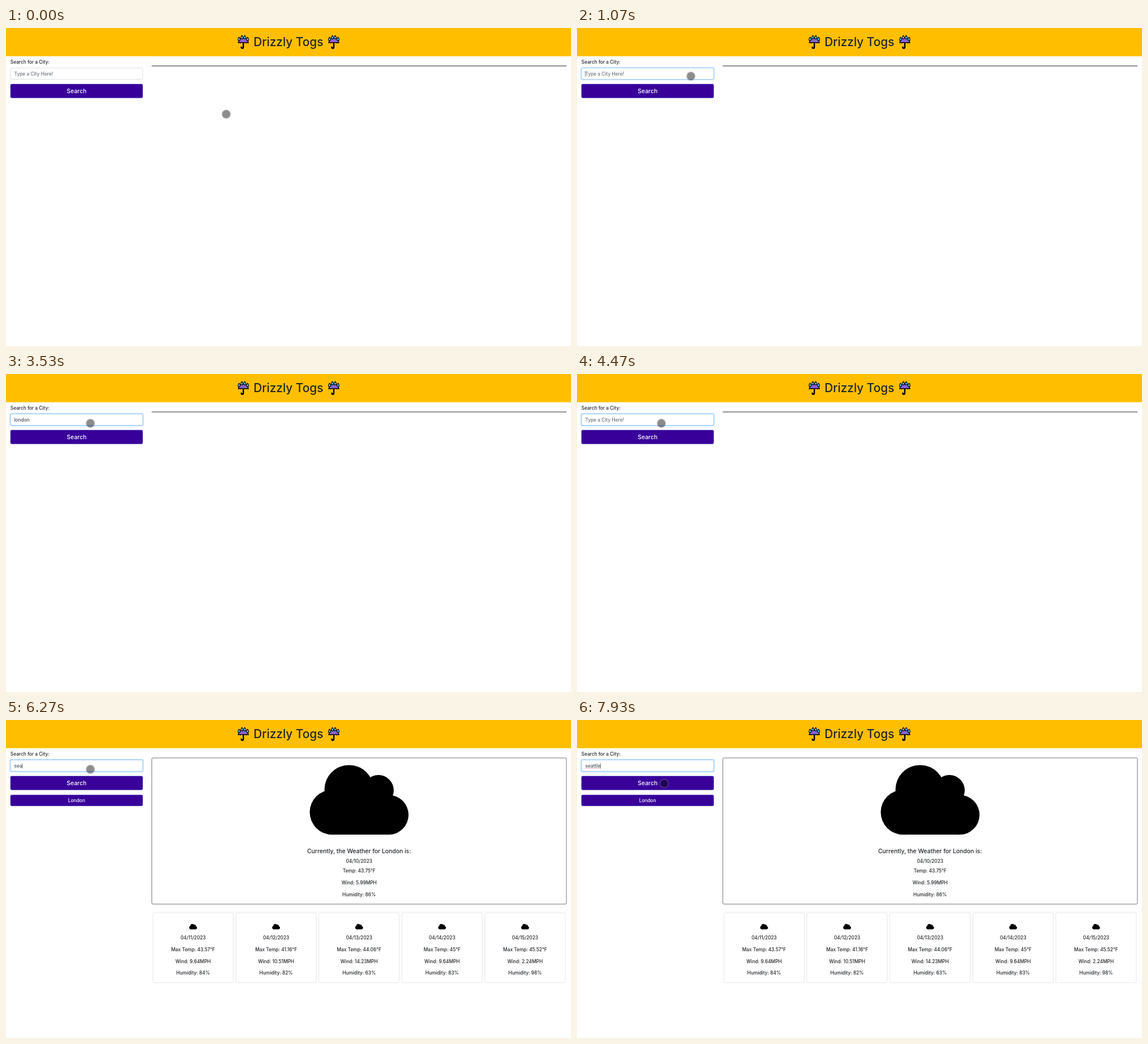
An HTML page for the animation above (8000 ms loop, 998 px wide and 561 px high).

```html
<!DOCTYPE html>
<html lang="en">
<head>
<meta charset="utf-8">
<title>Drizzly Togs</title>
<style>
  html, body { margin: 0; width: 100%; height: 100%; overflow: hidden; background: #fff; }
  svg { display: block; width: 100%; height: 100%; }
  text { font: 500 8.32px Inter, Roboto, sans-serif; fill: #212529; }
  .mid { text-anchor: middle; }
  .title { font-size: 20.8px; }
  .big { font-size: 10.4px; }
  .btn { fill: #380099; stroke: #2a1cb0; stroke-width: .5; }
  .light { fill: #fff; }
</style>
</head>
<body>
<svg viewBox="0 0 998 561" xmlns="http://www.w3.org/2000/svg">
  <defs>
    <g id="umbrella" stroke="#000" stroke-linejoin="round" stroke-linecap="round">
      <path d="M10.5 12V21.5Q10.5 23.8 8.7 23.8Q7 23.8 7 21.8" fill="none" stroke-width="2.4"/>
      <path d="M1.6 14.3C2 8.4 5.8 5.2 10.5 5.2S19 8.4 19.4 14.3Q17.8 12.8 16 14.3Q13.4 12.6 10.5 14.3Q7.6 12.6 5 14.3Q3.2 12.8 1.6 14.3Z"
        fill="#8b63d6" stroke-width="1.5"/>
      <g id="drops" fill="#4cc3f2" stroke-width="1.1"></g>
    </g>
    <g id="cloud">
      <circle cx="-17.7" cy="-18" r="43.5"/>
      <circle cx="34.2" cy="-17" r="27"/>
      <circle cx="-47.7" cy="21.7" r="39.5"/>
      <circle cx="52.3" cy="26.3" r="35"/>
      <rect x="-47.7" y="-20" width="100" height="81.2"/>
    </g>
  </defs>

  <rect width="998" height="561" fill="#fff"/>
  <rect width="998" height="49.8" fill="#ffbf00"/>
  <use href="#umbrella" x="408.7" y="12"/>
  <use href="#umbrella" x="568.5" y="12"/>
  <text class="mid title" x="498.8" y="31.8">Drizzly Togs</text>

  <text x="7.8" y="63">Search for a City:</text>
  <rect id="glow" x="7.1" y="69.7" width="235.2" height="21.7" rx="2.8" fill="none" stroke="#007bff" stroke-opacity=".25" stroke-width="1.7"/>
  <rect id="field" x="8" y="70.6" width="233.4" height="19.9" rx="2" fill="#fff" stroke="#ced4da" stroke-width=".7"/>
  <text id="hint" x="14.5" y="83.7" style="fill:#6c757d">Type a City Here!</text>
  <text id="typed" x="14.5" y="83.7" style="fill:#495057"></text>
  <path id="squiggle" fill="none" stroke="#f06060" stroke-width=".7" stroke-dasharray="1 .6"/>
  <rect id="caret" y="76.3" width=".6" height="9.4" fill="#222"/>
  <rect class="btn" x="8" y="99" width="233.4" height="24.3" rx="2.2"/>
  <text class="mid big light" x="124.7" y="115">Search</text>

  <rect id="emptyLine" x="257.4" y="66.4" width="732.6" height="1.1" fill="#343a40"/>
  <g id="current">
    <rect x="257.6" y="66.9" width="732.3" height="257.9" rx="2" fill="#fff" stroke="#343a40" stroke-width=".7"/>
    <use href="#cloud" transform="translate(623.7 141)"/>
    <text class="mid big" x="623.7" y="235.2">Currently, the Weather for London is:</text>
  </g>
  <g id="forecast">
    <rect class="btn" x="8" y="132.2" width="233.4" height="19.3" rx="2"/>
    <text class="mid light" x="124.7" y="144.6">London</text>
  </g>
  <g id="pointer">
    <circle r="7" fill="#000" fill-opacity=".45"/>
    <circle r="7.5" fill="none" stroke="#808080" stroke-opacity=".42" stroke-width="1.5"/>
  </g>
</svg>
<script>
const LOOP = 8000, TEXT_X = 14.5;
const $ = id => document.getElementById(id);

function add(parent, tag, attrs, text = '') {
  const el = document.createElementNS('http://www.w3.org/2000/svg', tag);
  for (const k in attrs) el.setAttribute(k, attrs[k]);
  el.textContent = text;
  parent.append(el);
}

function lines(parent, x, ys, texts) {
  texts.forEach((s, i) => add(parent, 'text', { class: 'mid', x, y: ys[i] }, s));
}

for (const [x, y] of [[3, 4.2], [8, 1.2], [13, 1.2], [18, 4.2]])
  add($('drops'), 'path', { d: `M${x} ${y}q2.2 2.7 2 4a2 2 0 0 1 -4 0q-.2 -1.3 2 -4z` });

lines($('current'), 623.7, [252, 269.2, 290, 310.8],
  ['04/10/2023', 'Temp: 43.75°F', 'Wind: 5.99MPH', 'Humidity: 86%']);

const days = [[43.57, 9.64, 84], [41.16, 10.51, 82], [44.06, 14.23, 63], [45, 9.64, 83], [45.52, 2.24, 98]];
days.forEach(([temp, wind, humidity], i) => {
  const x = 330.5 + i * 146.6, g = $('forecast');
  add(g, 'rect', { x: x - 71, y: 339.9, width: 142, height: 123.5, rx: 2, fill: '#fff', stroke: '#dcdcdc', 'stroke-width': .7 });
  add(g, 'use', { href: '#cloud', transform: `translate(${x} 364.5) scale(.0785)` });
  lines(g, x, [387, 407.8, 428.6, 449.4],
    [`04/${11 + i}/2023`, `Max Temp: ${temp}°F`, `Wind: ${wind}MPH`, `Humidity: ${humidity}%`]);
});

// Start time of each letter
const words = [
  { word: 'london', keys: [2400, 2600, 2700, 2800, 2900, 3000], marked: 4000, end: 4330 },
  { word: 'seattle', keys: [5670, 6070, 6270, 6530, 6670, 6870, 6930], marked: 7930, end: LOOP }
];
const caretSpans = [[1000, 1470], [2000, 3530], [4000, 4470], [5000, 5470], [5670, 7470], [7930, LOOP]];
const moves = [
  [70, 800, 389, 152, 203, 85],
  [1030, 1400, 203, 85, 149, 87],
  [7530, 7800, 149, 87, 156.5, 108],
  [7800, 7920, 156.5, 108, 154, 112]
];

const clamp = v => Math.min(1, Math.max(0, v));
const ease = v => v * v * (3 - 2 * v);
const show = (id, on) => $(id).setAttribute('visibility', on ? 'visible' : 'hidden');

function pointerAt(t) {
  const [a, b, x0, y0, x1, y1] = moves.filter(m => t >= m[0]).pop() || moves[0];
  const k = ease(clamp((t - a) / (b - a)));
  return [x0 + (x1 - x0) * k, y0 + (y1 - y0) * k];
}

function draw(t) {
  const entry = words.find(w => t >= w.keys[0] && t < w.end);
  const typed = entry ? entry.word.slice(0, entry.keys.filter(k => t >= k).length) : '';
  $('typed').textContent = typed;
  const end = TEXT_X + (typed ? $('typed').getComputedTextLength() : 0);
  show('hint', !typed);
  $('caret').setAttribute('x', end);
  show('caret', caretSpans.some(([a, b]) => t >= a && t < b));
  $('squiggle').setAttribute('d', `M${TEXT_X} 85.5H${end}`);
  show('squiggle', entry && t >= entry.marked);

  const focus = ease(clamp((t - 970) / 130));
  const mix = (a, b) => Math.round(a + (b - a) * focus);
  $('glow').setAttribute('opacity', focus);
  $('field').setAttribute('stroke', `rgb(${mix(206, 128)},${mix(212, 189)},${mix(218, 255)})`);

  show('emptyLine', t < 4530);
  show('current', t >= 4530);
  show('forecast', t >= 4670);
  $('pointer').setAttribute('transform', `translate(${pointerAt(t)})`);
}

function tick() {
  draw(performance.now() % LOOP);
  requestAnimationFrame(tick);
}
tick();
</script>
</body>
</html>
```
